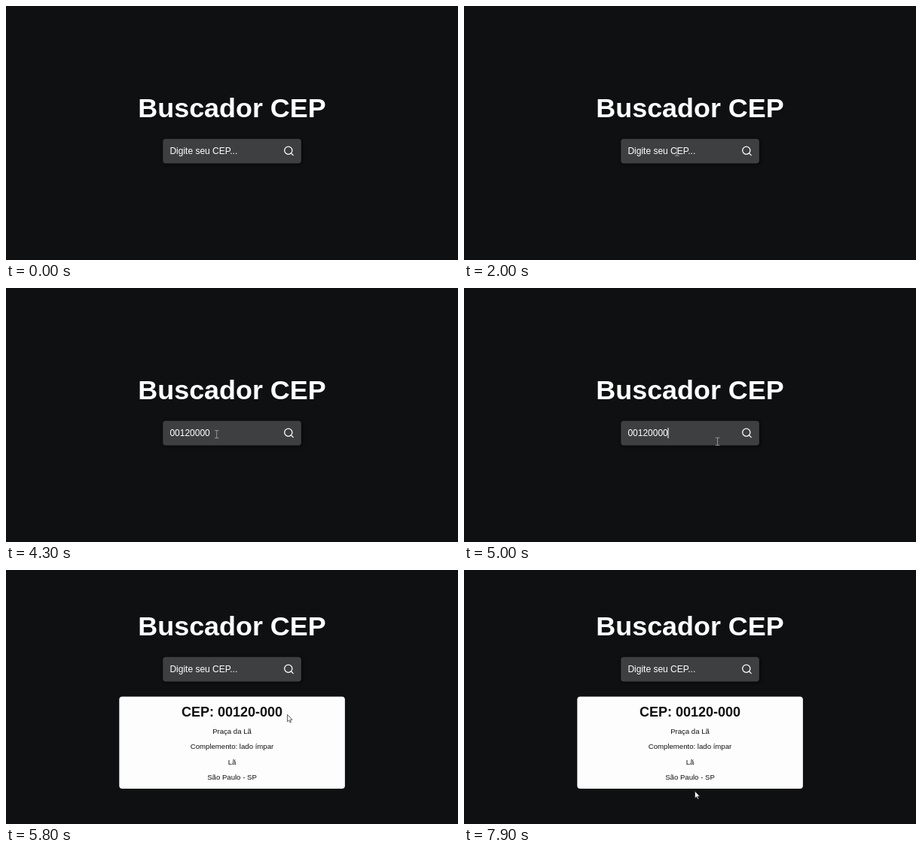
These frames come from a looping animation (600x338 px, 8000 ms). An HTML page:

```html
<!DOCTYPE html>
<html lang="pt-BR">
<head>
<meta charset="utf-8">
<title>Buscador CEP</title>
<style>
  html, body { margin: 0; width: 100%; height: 100%; overflow: hidden; background: #0e1012; }
  svg { display: block; width: 100vw; height: 100vh; font-family: "Liberation Sans", Arial, sans-serif; }
  .box { filter: drop-shadow(1px 1px 2px #000a); }
  .mid { text-anchor: middle; }
  .bold { font-weight: bold; }
</style>
</head>
<body>
<svg viewBox="0 0 600 338">
  <g id="search" fill="#fff">
    <text class="mid bold" x="300" y="147.6" font-size="35.9">Buscador CEP</text>
    <rect class="box" x="208.3" y="176.8" width="183.6" height="32.7" rx="4" fill="#3e3f41"/>
    <text id="field" x="217.4" y="197" font-size="12"></text>
    <g fill="none" stroke="#fff" stroke-width="1.3" stroke-linecap="round">
      <circle cx="374.8" cy="192.2" r="5.1"/>
      <path d="M378.5 195.9l2.7 2.7"/>
    </g>
    <rect id="caret" y="186" width="1" height="14"/>
  </g>
  <g id="card" class="mid" fill="#111" font-size="9.6">
    <rect x="150.3" y="168.5" width="299.6" height="122.5" rx="4" fill="#fdfdfd"/>
    <text class="bold" x="300" y="195" font-size="18">CEP: 00120-000</text>
    <text x="300" y="217.7">Praça da Lã</text>
    <text x="300" y="238.3">Complemento: lado ímpar</text>
    <text x="300" y="258.5">Lã</text>
    <text x="300" y="279">São Paulo - SP</text>
  </g>
  <g id="cursor" stroke-linejoin="round">
    <path id="arrow" d="M0 0V9.4L2.1 7.4 3.6 10.7 5 10.1 3.6 6.9H6.5Z" fill="#fff" stroke="#222" stroke-width=".7"/>
    <path id="beam" d="M-2.8 -5H2.8M0 -5V5M-2.8 5H2.8" fill="none" stroke="#aaa" stroke-width=".8"/>
    <path id="hand" d="M-1 1A1 1 0 0 1 1 1V5L4.6 5.8Q5.6 6.2 5.5 7.8L4.6 12H-.2L-3.4 7.9Q-3 6.2 -1 7.6Z" fill="#fff" stroke="#333" stroke-width=".6"/>
  </g>
</svg>
<script>
const LOOP = 8000, STEP = 100, BLINK = 550;
const CLICK = 2350, PASTE = 3500, RESULT = 5800;
const $ = id => document.getElementById(id);
const show = (id, on) => $(id).setAttribute("visibility", on ? "visible" : "hidden");

const easeIn = k => k * k;
const easeOut = k => 1 - (1 - k) ** 3;
const easeInOut = k => k < .5 ? 4 * k ** 3 : 1 - 4 * (1 - k) ** 3;

// Each gesture follows a quadratic curve: start, bend, end
const gestures = [
  { from: 1100, to: 2200, ease: easeOut, x: [175, 344, 282], y: [296, 297, 193] },
  { from: 4100, to: 5400, ease: easeInOut, x: [282, 200, 373.5], y: [193, 250, 192.4] },
  { from: 6000, to: 7200, ease: easeIn, x: [373.3, 379, 306.5], y: [192, 228, 294.3] }
];

const bend = ([a, b, c], u) => a * (1 - u) ** 2 + 2 * b * u * (1 - u) + c * u * u;

function pointerAt(t) {
  const g = gestures.findLast(g => t >= g.from);
  if (!g) return null;
  const u = g.ease(Math.min(1, (t - g.from) / (g.to - g.from)));
  return [bend(g.x, u), bend(g.y, u)];
}

function caretOn(t) {
  const since = t - (t < PASTE ? CLICK : PASTE);
  return since >= 0 && t < RESULT && Math.floor(since / BLINK) % 2 === 0;
}

function draw(now) {
  const t = Math.floor(now % LOOP / STEP) * STEP;
  const found = t >= RESULT, pasted = t >= PASTE && !found;

  $("search").setAttribute("transform", `translate(0 ${found ? -61 : 0})`);
  $("field").textContent = pasted ? "00120000" : "Digite seu CEP...";
  $("caret").setAttribute("x", pasted ? 270.5 : 217.5);
  show("caret", caretOn(t));
  show("card", found);

  const pos = pointerAt(t);
  let kind = null;
  if (pos) {
    const [x, y] = pos;
    const overField = !found && y > 177 && y < 210;
    kind = !overField ? "arrow" : x > 366 ? "hand" : "beam";
    $("cursor").setAttribute("transform", `translate(${x} ${y})`);
  }
  for (const id of ["arrow", "beam", "hand"]) show(id, id === kind);
  requestAnimationFrame(draw);
}
requestAnimationFrame(draw);
</script>
</body>
</html>
```
